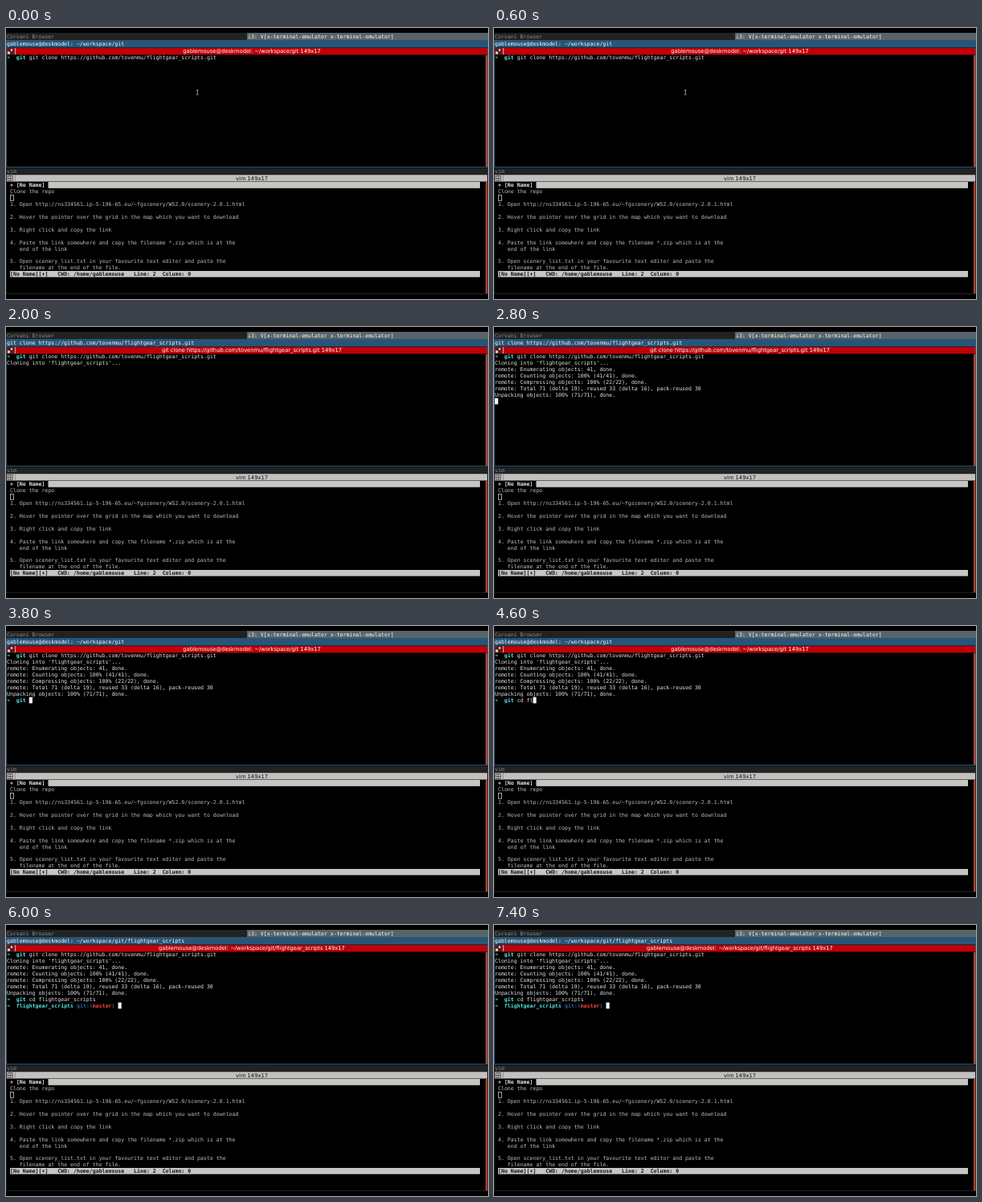
An HTML page with a canvas for the animation above (8000 ms loop, 600 by 338 pixels).

```html
<!DOCTYPE html>
<html lang="en">
<head>
<meta charset="utf-8">
<title>Terminal session</title>
<style>
  html, body { margin: 0; width: 100%; height: 100%; overflow: hidden; background: #000; }
  canvas { display: block; width: 600px; height: 338px; }
</style>
</head>
<body>
<canvas id="stage"></canvas>
<script>
const canvas = document.getElementById('stage');
const ratio = window.devicePixelRatio || 1;
canvas.width = 600 * ratio;
canvas.height = 338 * ratio;
const ctx = canvas.getContext('2d');

const LOOP = 8000;
const CELL = 3.958;
const ROW = 7.93;
const MONO = '6.575px "DejaVu Sans Mono", monospace';
const SANS = '6.72px "DejaVu Sans", sans-serif';
const GREEN = '#4be38a', CYAN = '#4fe3dc', BLUE = '#2f62a0', RED = '#f0483c';
const WHITE = '#e4e4e4', GREY = '#bdbdbd', BAR = '#c6c6c2';

const HOST = 'gablemouse@deskmodel: ~/workspace/git';
const REPO = 'flightgear_scripts';
const URL_TEXT = `https://github.com/tovenmu/${REPO}.git`;
const CLONE = `git clone ${URL_TEXT}`;
const OUTPUT = [
  [1600, `Cloning into '${REPO}'...`],
  [2400, 'remote: Enumerating objects: 41, done.'],
  [2400, 'remote: Counting objects: 100% (41/41), done.'],
  [2400, 'remote: Compressing objects: 100% (22/22), done.'],
  [2600, 'remote: Total 71 (delta 19), reused 33 (delta 16), pack-reused 30'],
  [2600, 'Unpacking objects: 100% (71/71), done.']
];
const NOTES = [
  'Clone the repo',
  '',
  '1. Open http://ns334561.ip-5-196-65.eu/~fgscenery/WS2.0/scenery-2.0.1.html',
  '',
  '2. Hover the pointer over the grid in the map which you want to download',
  '',
  '3. Right click and copy the link',
  '',
  '4. Paste the link somewhere and copy the filename *.zip which is at the',
  '   end of the link',
  '',
  '5. Open scenery_list.txt in your favourite text editor and paste the',
  '   filename at the end of the file.'
];

function rect(x, y, w, h, color) {
  ctx.fillStyle = color;
  ctx.fillRect(x, y, w, h);
}

function mono(text, x, y, color, bold) {
  ctx.font = (bold ? 'bold ' : '') + MONO;
  ctx.textAlign = 'left';
  ctx.fillStyle = color;
  ctx.fillText(text, x, y);
}

function centered(text, y, color) {
  ctx.font = SANS;
  ctx.textAlign = 'center';
  ctx.fillStyle = color;
  ctx.fillText(text, 306, y);
}

const termY = row => 39.4 + ROW * row;
const vimY = row => 198.2 + ROW * row;

// Draws [text, color, bold] runs and returns the next free column.
function termLine(row, runs) {
  let col = 0;
  for (const [text, color = WHITE, bold] of runs) {
    mono(text, 1 + col * CELL, termY(row), color, bold);
    col += text.length;
  }
  return col;
}

const prompt = (dir, ...rest) => [['➜', GREEN, true], ['  '], [dir + ' ', CYAN, true], ...rest];

function cursor(row, col) {
  rect(1 + col * CELL, 33.2 + ROW * row, 4.2, 7.7, '#f4f4f4');
}

function drawTabs() {
  rect(0, 6, 300, 9, '#222');
  rect(300, 6, 300, 9, '#596468');
  mono('Corvani Browser', 1, 12.5, '#888');
  mono('i3: V[x-terminal-emulator x-terminal-emulator]', 301, 12.5, '#fff');
}

function drawTopFrame(shell, t) {
  const running = t >= 1600 && t < 3000;
  const title = running ? CLONE : HOST + (t >= 6000 ? '/' + REPO : '');
  rect(0, 15, 600, 159, '#285577');
  rect(1, 24.5, 598, 148.5, '#000');
  mono(title, 1, 22.2, '#fff');
  rect(1, 25, 598, 8.4, '#c00006');
  centered(title + ' 149x17', 31.4, '#fff');
  rect(1.5, 25.6, 8, 7.4, '#4a2022');
  rect(2, 29.5, 3, 3, '#d8d8d8');
  rect(5.8, 26.3, 2.4, 2.4, '#d8d8d8');
  rect(11, 25, 1, 8, '#dba5a5');
  rect(597, 34, 2.2, 139, '#b5432f');
}

function typed(t) {
  if (t >= 5800) return `cd ${REPO}`;
  const count = t < 4000 ? 0 : Math.min(9, 1 + Math.floor(Math.floor((t - 4000) / 200) * 1.34));
  return 'cd flight'.slice(0, count);
}

function drawShell(t) {
  termLine(0, prompt('git', [CLONE]));
  let row = 1;
  for (const [start, text] of OUTPUT) {
    if (t >= start) termLine(row++, [[text]]);
  }
  if (t >= 2600 && t < 3000) cursor(row, 0);
  if (t >= 3000) {
    const col = termLine(row, prompt('git', [typed(t)]));
    if (t < 6000) cursor(row, col);
  }
  if (t >= 6000) {
    const col = termLine(row + 1, prompt(REPO,
      ['git:(', BLUE, true], ['master', RED, true], [')', BLUE, true], [' ']));
    cursor(row + 1, col);
  }
}

function drawPointer() {
  rect(237.8, 77.5, 0.8, 5.5, '#c8c8c8');
  rect(236.8, 77, 2.8, 0.7, '#aaa');
  rect(236.8, 82.8, 2.8, 0.7, '#aaa');
}

function drawVim() {
  rect(0, 174.5, 600, 157.5, '#222');
  rect(1, 183, 598, 148, '#000');
  mono('vim', 1, 181.2, '#888');
  rect(1, 183.2, 598, 8.3, '#c3c1c0');
  centered('vim 149x17', 189.8, '#111');
  ctx.strokeStyle = '#444';
  ctx.lineWidth = 0.8;
  ctx.strokeRect(2.2, 184.6, 6, 5.6);
  rect(4.8, 184.6, 0.8, 5.6, '#444');
  rect(2.2, 187, 6, 0.8, '#444');
  rect(11, 183.5, 0.8, 8, '#888');
  rect(597, 192, 2.2, 139, '#b5432f');

  rect(52.5, 192, 537.5, 7.8, BAR);
  mono('+ [No Name]', 5, vimY(0), '#e8e8e8', true);
  NOTES.forEach((line, i) => mono(line, 5, vimY(i + 1), GREY));
  ctx.strokeStyle = '#ccc';
  ctx.strokeRect(5.4, 208.3, 4, 7);
  rect(5, 303, 585, 7.7, BAR);
  mono('[No Name][+]   CWD: /home/gablemouse   Line: 2  Column: 0', 5, vimY(14), '#111', true);
}

function draw(t) {
  ctx.setTransform(ratio, 0, 0, ratio, 0, 0);
  ctx.textRendering = 'geometricPrecision';
  rect(0, 0, 600, 338, '#000');
  drawTabs();
  drawTopFrame('git', t);
  drawShell(t);
  if (t < 1600) drawPointer();
  drawVim();
}

const start = performance.now();
function tick(now) {
  draw(Math.max(0, now - start) % LOOP);
  requestAnimationFrame(tick);
}
draw(0);
requestAnimationFrame(tick);
</script>
</body>
</html>
```
